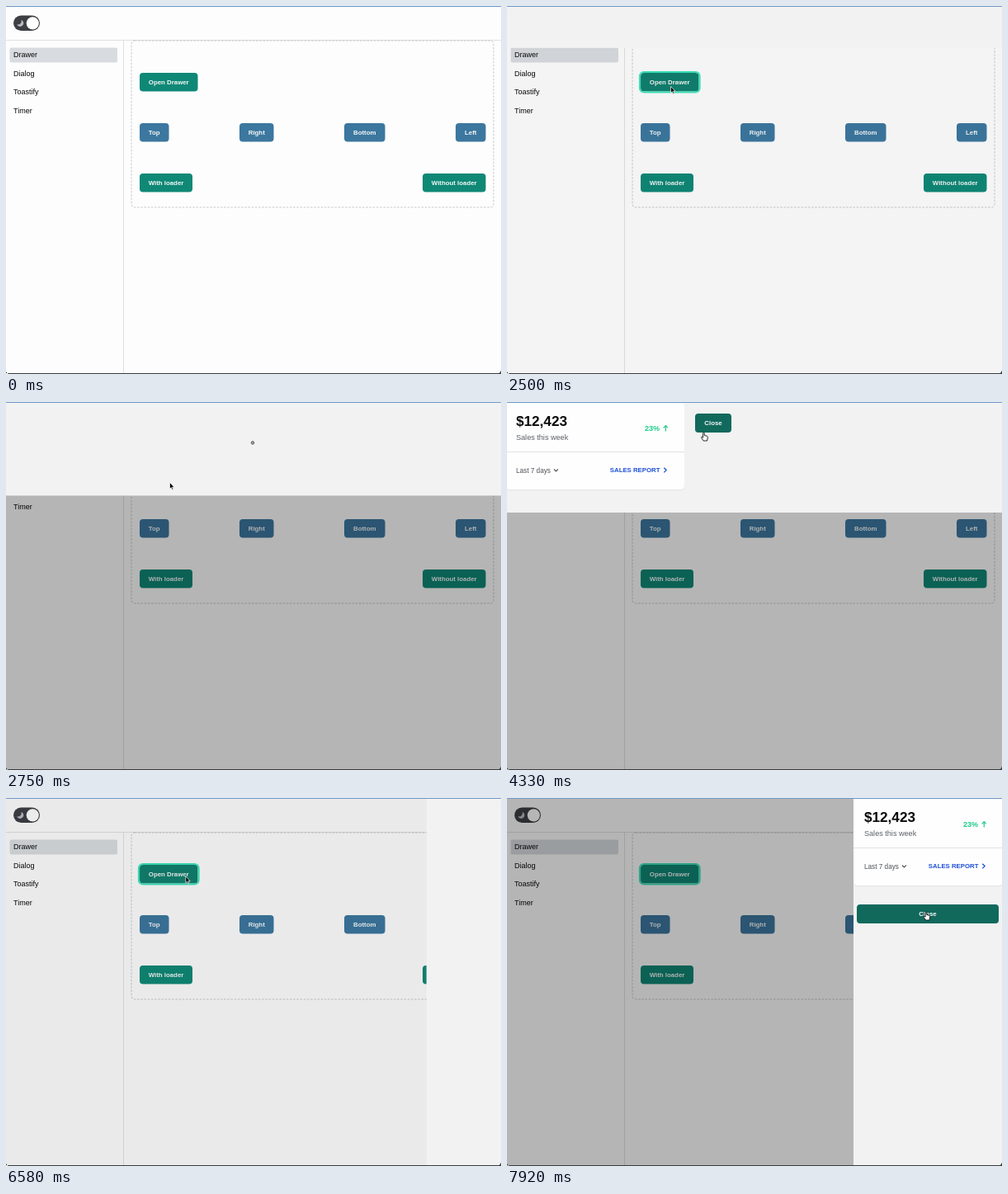
These frames come from a looping animation (600x446 px, 8000 ms). An HTML page:

```html
<!DOCTYPE html>
<html lang="en">
<head>
<meta charset="utf-8">
<title>Drawer demo</title>
<style>
html, body { margin: 0; width: 100%; height: 100%; overflow: hidden; background: #fdfdfd; }
svg { display: block; width: 100%; height: 100%; }
text { font-family: "Liberation Sans", Arial, sans-serif; }
.menu { font-size: 9px; fill: #080808; }
.label { font-size: 7.85px; font-weight: bold; fill: #f4f8f8; text-anchor: middle; }
</style>
</head>
<body>
<svg id="stage" viewBox="0 0 600 446">
  <rect width="600" height="446" fill="#fdfdfd"/>
  <g id="page">
    <path d="M0 41.5H600M142.5 41V446" stroke="#dfe0e2" fill="none"/>
    <rect x="9" y="11.5" width="32" height="18.5" rx="9.25" fill="#3d3f45"/>
    <circle cx="32.3" cy="20.8" r="7.6" fill="#fff"/>
    <path d="M18.5 16.7A4.2 4.2 0 1 1 13.2 22.2A4.2 4.2 0 0 0 18.5 16.7Z" fill="#b9bbc0"/>
    <rect x="4.500" y="50.500" width="130.500" height="18" rx="2" fill="#d8dce0"/>
    <rect x="152" y="42" width="439" height="202" rx="4" fill="none" stroke="#c6c9cc" stroke-dasharray="2.600 1.600"/>
    <g id="menu"></g>
    <g id="buttons"></g>
    <rect id="ring" x="161" y="80" width="72.500" height="24.500" rx="5" fill="none" stroke="#3ce4bb" stroke-width="2.200"/>
  </g>
  <rect id="shade" width="600" height="446" fill="#000"/>
  <g id="drawer">
    <rect id="panel" fill="#f2f2f2"/>
    <circle id="loader" fill="#a8a8a8" stroke="#555"/>
    <g id="content">
      <path id="cardShadow" fill="#000" opacity=".05" transform="translate(0 1.200)"/>
      <path id="card" fill="#fefefe"/>
      <path id="rule" stroke="#e2e3e5"/>
      <g id="left">
        <text x="11" y="29.200" font-size="17.150" font-weight="bold" fill="#0a0a0a">$12,423</text>
        <text x="11" y="45.500" font-size="9.100" fill="#5d6066">Sales this week</text>
        <text x="11" y="85.500" font-size="8.200" fill="#4d5056">Last 7 days</text>
        <path d="M57 81.500l2.400 2.400l2.400-2.400" fill="none" stroke="#4d5056" stroke-width="1.100"/>
      </g>
      <g id="right">
        <text x="167" y="35" font-size="9.100" font-weight="bold" fill="#1fcb8b">23%</text>
        <path d="M192.300 35.500V28.800M189.700 31.300L192.300 28.700L194.900 31.300" fill="none" stroke="#1fcb8b" stroke-width="1.200"/>
        <text x="124.800" y="85.400" font-size="7.800" font-weight="bold" fill="#1d4fd7">SALES REPORT</text>
        <path d="M190.300 79.800l2.800 2.800l-2.800 2.800" fill="none" stroke="#1d4fd7" stroke-width="1.300"/>
      </g>
      <rect id="closeBox" height="23" rx="4"/>
      <text id="closeText" class="label">Close</text>
    </g>
  </g>
  <rect width="600" height="1" fill="#6f98c6"/>
  <path d="M0 445H600V446H0ZM600 441.500V446H595.500Q599 445 600 441.500ZM0 443V446H3Q1 445 0 443Z" fill="#3a3b3d"/>
  <g id="cursor">
    <path id="arrow" d="M0 0V7.800L1.800 6.200L3 9L4.300 8.400L3.100 5.700H5.400Z" fill="#000" stroke="#fff" stroke-width=".7"/>
    <path id="hand" d="M-.9 .6Q0-.5 .8 .6V3.600L4 4.300Q5 4.700 4.800 6L4 10H-.4L-3 6.200Q-3 4.900-1.800 5.400L-.9 6.200Z" fill="#fff" stroke="#111" stroke-width=".9"/>
  </g>
</svg>
<script>
const $ = id => document.getElementById(id);
const NS = "http://www.w3.org/2000/svg";
const LOOP = 8000, SHADE = 0.287;
const SLIDE = 700, CLOSE = 560, LOADED = 920;
const GREEN = "#0f8876", GREEN_HOVER = "#117f6e", BLUE = "#3c779f", BLUE_HOVER = "#346a8f";

function set(el, attrs) {
  for (const k in attrs) el.setAttribute(k, attrs[k]);
  return el;
}
function add(parent, tag, attrs, text) {
  const el = set(document.createElementNS(NS, tag), attrs);
  if (text) el.textContent = text;
  return parent.appendChild(el);
}
const show = (el, on) => el.setAttribute("visibility", on ? "inherit" : "hidden");
const clamp = v => Math.min(1, Math.max(0, v));
const inside = (p, b) => p.x > b.x && p.x < b.x + b.w && p.y > b.y && p.y < b.y + b.h;

// CSS "ease" timing curve
function ease(x) {
  if (x <= 0 || x >= 1) return clamp(x);
  const bez = (u, a, b) => 3 * u * (1 - u) ** 2 * a + 3 * u * u * (1 - u) * b + u ** 3;
  let lo = 0, hi = 1;
  for (let i = 0; i < 20; i++) {
    const mid = (lo + hi) / 2;
    if (bez(mid, 0.25, 0.25) < x) lo = mid; else hi = mid;
  }
  return bez(lo, 0.1, 1);
}

["Drawer", "Dialog", "Toastify", "Timer"].forEach((name, i) =>
  add($("menu"), "text", { x: 9, y: 62.2 + i * 22.6, class: "menu" }, name));

const buttons = [
  ["Open Drawer", 162, 81, 70.5, 1], ["Top", 162, 142, 35.5, 0],
  ["Right", 283, 142, 41.5, 0], ["Bottom", 410, 142, 49.5, 0],
  ["Left", 545, 142, 36.5, 0], ["With loader", 162, 203, 64, 1],
  ["Without loader", 505, 203, 76.5, 1]
].map(([name, x, y, w, green]) => {
  const el = add($("buttons"), "rect", { x, y, width: w, height: 22.5, rx: 4 });
  add($("buttons"), "text", { x: x + w / 2, y: y + 14, class: "label" }, name);
  return { x, y, w, h: 22.5, el, fills: green ? [GREEN, GREEN_HOVER] : [BLUE, BLUE_HOVER] };
});

// time, x, y
const path = [
  [80, 279, 403], [400, 282, 300], [800, 278, 136], [950, 277, 134],
  [1600, 204, 99], [2000, 198.5, 97.5], [2850, 198.5, 97.5],
  [3500, 229, 52], [3950, 238.5, 37], [4400, 238.5, 37],
  [4950, 247, 32], [5080, 247, 32], [5650, 303, 151], [5880, 303, 151],
  [6300, 217.8, 95], [7200, 217.8, 95], [7780, 508, 138], [8000, 508, 138]
];
function pointer(t) {
  let i = 1;
  while (i < path.length - 1 && path[i][0] < t) i++;
  const [t0, x0, y0] = path[i - 1], [t1, x1, y1] = path[i];
  const k = clamp((t - t0) / (t1 - t0)), s = k * k * (3 - 2 * k);
  return { x: x0 + (x1 - x0) * s, y: y0 + (y1 - y0) * s };
}

const runs = [
  { side: "top", open: 2330, close: 4370 },
  { side: "right", open: 6375, close: Infinity }
];

function drawDrawer(run, t, mouse) {
  const age = t - run.open, gone = t - run.close;
  const top = run.side === "top", loaded = age >= LOADED;
  const w = top ? 600 : 180, h = top ? (loaded ? 134 : 128) : 446;
  const shown = ease(age / SLIDE) * (1 - ease(gone / CLOSE));
  const ox = top ? 0 : 600 - w * shown, oy = top ? -h * (1 - shown) : 0;
  set($("drawer"), { transform: `translate(${ox} ${oy})` });
  set($("panel"), { width: w, height: h });

  const pulse = ((age - 400 + LOOP) % 1000) / 1000;
  set($("loader"), { cx: w / 2 - 1, cy: h / 2, r: 1.5 + 12 * pulse, "fill-opacity": 1 - pulse, "stroke-opacity": 1 - pulse });
  show($("loader"), !loaded && age > 400);
  show($("content"), loaded);

  const x0 = top ? -2 : 0, x1 = top ? 215 : 181;
  const outline = `M${x0} 1H${x1 - 4}Q${x1} 1 ${x1} 5V101Q${x1} 106 ${x1 - 5} 106H${x0 + 5}Q${x0} 106 ${x0} 101V1Z`;
  set($("card"), { d: outline });
  set($("cardShadow"), { d: outline });
  set($("rule"), { d: `M${x0} 60.5H${x1}` });
  set($("left"), { transform: `translate(${top ? 0 : 2} 0)` });
  set($("right"), { transform: `translate(${top ? 0 : -34} 0)` });

  const box = top ? { x: 228, y: 14, w: 44, h: 23 } : { x: 4, y: 129, w: 172, h: 23 };
  const over = loaded && gone < 80 && inside({ x: mouse.x - ox, y: mouse.y - oy - 0.5 }, box);
  set($("closeBox"), { x: box.x, y: box.y, width: box.w, fill: over ? "#11695c" : GREEN });
  set($("closeText"), { x: box.x + box.w / 2, y: box.y + 14.2 });
  return { over, dim: clamp((age - 140) / 260) * (1 - clamp(gone / 450)) };
}

function draw(t) {
  const mouse = pointer(t);
  const run = runs.find(r => t >= r.open && t < r.close + CLOSE);
  show($("drawer"), run);
  const { over, dim } = run ? drawDrawer(run, t, mouse) : { over: false, dim: 0 };

  set($("shade"), { opacity: SHADE * dim });
  $("page").style.filter = dim > 0.3 ? `blur(${0.6 * dim}px)` : "none";
  show($("ring"), run && t < run.close + 200);
  for (const b of buttons) {
    const hot = t >= 80 && dim < 0.5 && inside(mouse, b);
    set(b.el, { fill: b.fills[hot ? 1 : 0] });
  }

  show($("cursor"), t >= 80);
  set($("cursor"), { transform: `translate(${mouse.x} ${mouse.y})` });
  show($("hand"), over);
  show($("arrow"), !over);
}

const start = performance.now();
function tick() {
  draw((performance.now() - start) % LOOP);
  requestAnimationFrame(tick);
}
tick();
</script>
</body>
</html>
```
